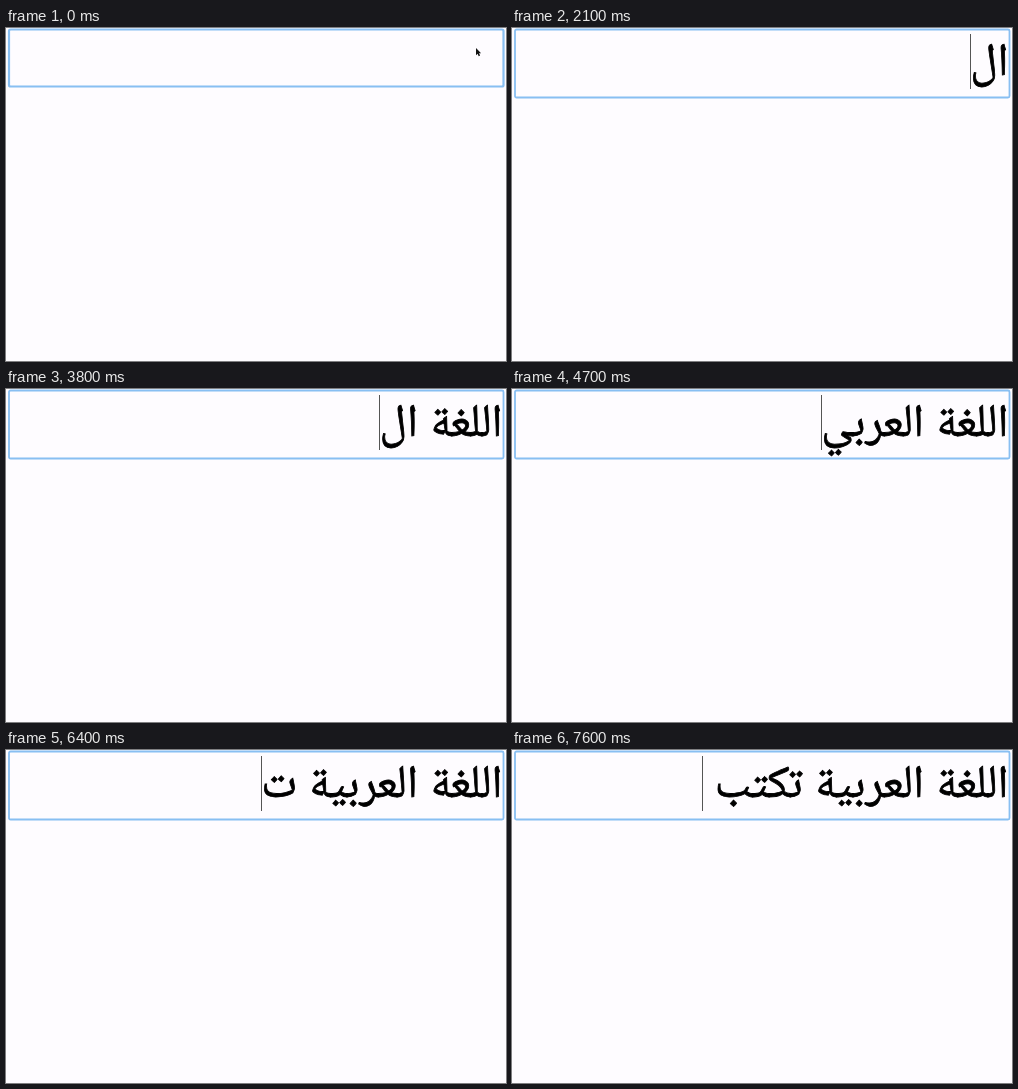
Animation, 500 px wide and 333 px high, one loop 8000 ms. Source, as an HTML page:

```html
<!DOCTYPE html>
<html lang="ar">
<head>
<meta charset="utf-8">
<style>
  html, body { margin: 0; width: 100%; height: 100%; overflow: hidden; background: #fefcff; }
  svg { display: block; width: 500px; height: 333px; }
  text {
    font: 46px "Noto Naskh Arabic", "Noto Sans", "DejaVu Sans", sans-serif;
    word-spacing: 2px;
    direction: rtl;
    white-space: pre;
    stroke: #000;
    stroke-width: .8px;
  }
</style>
</head>
<body>
<svg viewBox="0 0 500 333">
  <rect id="field" x="3" y="1.5" width="494.5" rx="1.5" fill="none" stroke="#88bff2"/>
  <path id="pointer" d="M470 20v7.2l1.6-1.4 1.1 2.4 1.4-.7-1.1-2.2h2.1z" fill="#111"/>
  <text id="phrase" x="496.5" y="47" xml:space="preserve"></text>
  <rect id="caret" y="6" width="1" fill="#555"/>
</svg>
<script>
const LOOP = 8000;
const FRAME = 100;
const BLINK = 500;
const FOCUS = 600;
const RIGHT = 496.5;
const PHRASE = "اللغة العربية تكتب ";

// Typing pace: [time, letters typed], evenly spaced in between
const PACE = [[1500, 1], [2500, 4], [3100, 5], [4700, 12], [5700, 14], [6400, 15], [7600, 19]];

const keyTimes = [PACE[0][0]];
PACE.slice(1).forEach(([end, total], i) => {
  const [begin, done] = PACE[i];
  for (let n = 1; n <= total - done; n++) {
    const time = begin + (end - begin) * n / (total - done);
    keyTimes.push(Math.ceil(time / FRAME) * FRAME);
  }
});

const $ = id => document.getElementById(id);
const set = (el, attrs) => Object.entries(attrs).forEach(([k, v]) => el.setAttribute(k, v));
const show = (el, on) => set(el, { visibility: on ? "visible" : "hidden" });

const phrase = $("phrase");
const caret = $("caret");

function draw(time) {
  const count = keyTimes.filter(key => key <= time).length;
  const empty = count === 0;
  const typed = PHRASE.slice(0, count);
  if (phrase.textContent !== typed) phrase.textContent = typed;

  const width = empty ? 0 : phrase.getComputedTextLength();
  const idle = time - (empty ? FOCUS : keyTimes[count - 1]);
  set(caret, { x: Math.floor(RIGHT - width), height: empty ? 50 : 55 });
  show(caret, idle >= 0 && idle % (2 * BLINK) < BLINK);

  set($("field"), { height: empty ? 57 : 68, "stroke-width": empty ? 2.2 : 1.8 });
  show($("pointer"), empty);
}

const start = performance.now();
function tick() {
  draw((performance.now() - start) % LOOP);
  requestAnimationFrame(tick);
}
tick();
</script>
</body>
</html>
```
